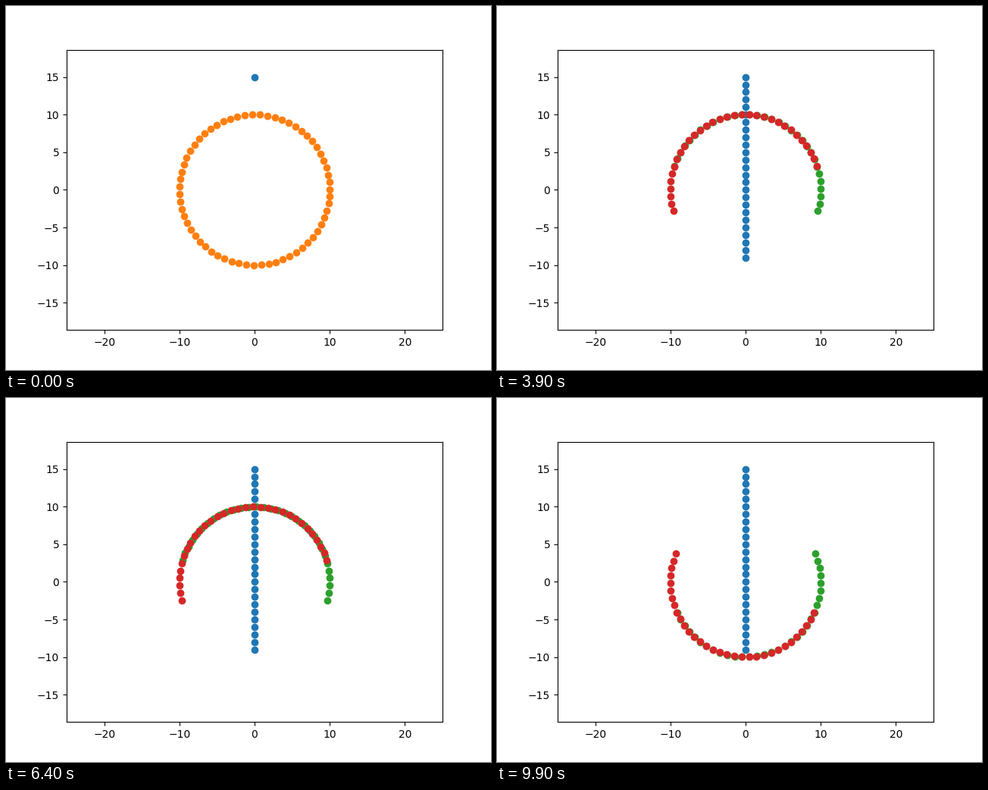
Write a matplotlib script that moves like this. It is 640 px wide and 480 px high and loops after 10 s.

```python
import numpy as np
import matplotlib.pyplot as plt
from matplotlib.animation import FuncAnimation

FRAMES = 100
RADIUS = 10
TOP = 15
SPLIT = 26    # the ring breaks into two arcs once the trail has crossed it
SETTLE = 35   # the trail is cut back to the inside of the ring
SPEED = 0.25  # radians per frame

fig, ax = plt.subplots(figsize=(6.4, 4.8), dpi=100)
half = 25 * (4.8 * 0.77) / (6.4 * 0.775)  # equal scale on both axes
ax.set_xlim(-25, 25)
ax.set_ylim(-half, half)

trail, ring, left, right = (ax.plot([], [], "o", color=f"C{k}")[0] for k in range(4))

full = np.arange(0, 2 * np.pi, 0.1)
arc = np.arange(0, np.pi, 0.1)


def circle(t):
    return RADIUS * np.cos(t), RADIUS * np.sin(t)


def update(n):
    low = TOP - n if n < SETTLE else 1 - RADIUS
    y = np.arange(TOP, low - 1, -1)
    trail.set_data(np.zeros(len(y)), y)

    split = n >= SPLIT
    ring.set_data(*circle(full))
    ring.set_visible(not split)

    x, y = circle(-(arc + SPEED * n))
    left.set_data(x, y)
    right.set_data(-x, y)
    for line in (left, right):
        line.set_visible(split)
    return trail, ring, left, right


anim = FuncAnimation(fig, update, frames=FRAMES, init_func=lambda: update(0),
                     interval=100, repeat=True, repeat_delay=0)
plt.show()
```
